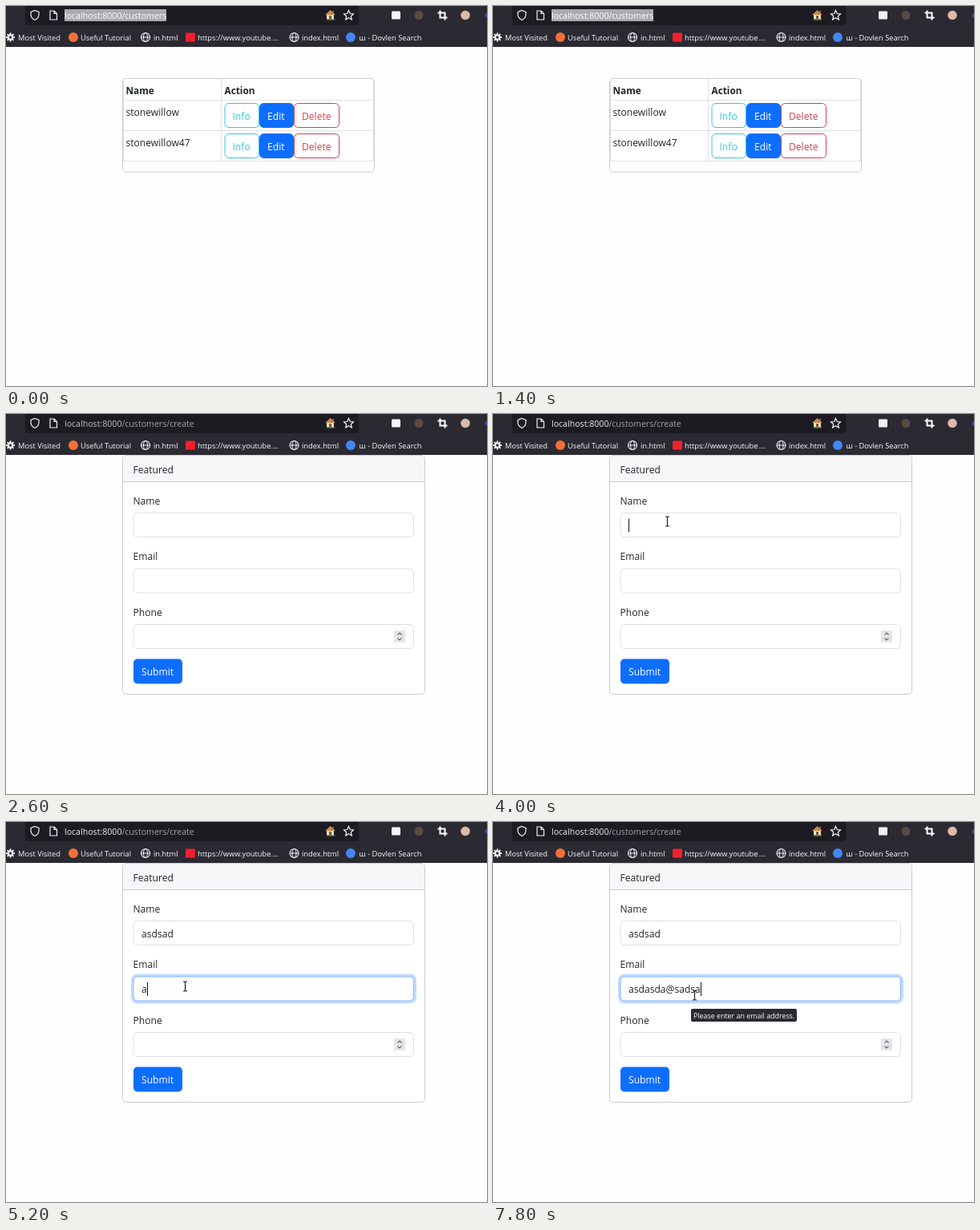
Recreate the animation shown at these times as an HTML page with a canvas. Size 600 by 474 pixels, loop 8000 ms.

```html
<!DOCTYPE html>
<html lang="en">
<head>
<meta charset="utf-8">
<title>Customers</title>
<style>
html, body { margin: 0; width: 100%; height: 100%; overflow: hidden; background: #fefefe; }
canvas { display: block; width: 600px; height: 474px; }
</style>
</head>
<body>
<canvas id="stage" width="600" height="474"></canvas>
<script>
const LOOP = 8000, STEP = 200;
const ctx = document.getElementById('stage').getContext('2d');
const FONT = '"Open Sans", "Noto Sans", sans-serif';
const BAR = '#2b2a33', INK = '#212529', BLUE = '#0d6efd', PALE = '#f4f4f8';

// Last entry whose start time has passed
const at = (track, t) => track.reduce((now, k) => (k[0] <= t ? k : now));

// time, x, y, shape
const pointer = [
  [0], [200, 560, 4, 'arrow'], [400, 430, 60, 'arrow'], [600, 300, 96, 'arrow'],
  [800, 222, 98, 'arrow'], [1000, 380, 50, 'arrow'], [1200, 486, 6, 'arrow'], [1400],
  [2000, 489, 1, 'arrow'], [2200, 589, 2, 'arrow'], [2600],
  [2800, 585, 4, 'arrow'], [3000, 470, 50, 'arrow'], [3200, 340, 96, 'arrow'],
  [3400, 250, 132, 'beam'], [3600, 219, 135, 'beam'], [3800, 217, 134, 'beam'],
  [4800, 222, 199, 'beam'], [5000, 223, 205, 'beam'],
  [6200, 240, 210, 'beam'], [6400, 249, 214, 'beam'], [7000, 250, 215, 'beam'], [7200, 251, 216, 'beam']
];
const nameText = [[0, ''], [4200, 'a'], [4400, 'asd'], [4600, 'asdsad']];
const emailText = [
  [0, ''], [5200, 'a'], [5400, 'asd'], [5600, 'asdas'], [5800, 'asdasda'],
  [6400, 'asdasda@'], [6600, 'asdasda@s'], [6800, 'asdasda@sa'], [7000, 'asdasda@sad'], [7200, 'asdasda@sadsa']
];

function text(str, x, y, size = 12.1, color = INK, weight = 400) {
  ctx.font = `${weight} ${size}px ${FONT}`;
  ctx.fillStyle = color;
  ctx.fillText(str, x, y);
  return ctx.measureText(str).width;
}

function rect(x, y, w, h, color) {
  ctx.fillStyle = color;
  ctx.fillRect(x, y, w, h);
}

function box(x, y, w, h, r, fill, stroke, width = 1) {
  ctx.beginPath();
  ctx.roundRect(x, y, w, h, r);
  paint(fill, stroke, width);
}

function disc(x, y, r, fill, stroke, width = 1) {
  ctx.beginPath();
  ctx.arc(x, y, r, 0, Math.PI * 2);
  paint(fill, stroke, width);
}

function shape(d, x, y, fill, stroke, width = 1) {
  ctx.save();
  ctx.translate(x, y);
  const path = new Path2D(d);
  if (fill) { ctx.fillStyle = fill; ctx.fill(path); }
  if (stroke) { ctx.strokeStyle = stroke; ctx.lineWidth = width; ctx.stroke(path); }
  ctx.restore();
}

function paint(fill, stroke, width) {
  if (fill) { ctx.fillStyle = fill; ctx.fill(); }
  if (stroke) { ctx.strokeStyle = stroke; ctx.lineWidth = width; ctx.stroke(); }
}

function globe(x, y) {
  disc(x, y, 5.5, null, PALE, 1.1);
  ctx.beginPath();
  ctx.ellipse(x, y, 2.5, 5.5, 0, 0, Math.PI * 2);
  paint(null, PALE, 1);
  shape('M-5.5 0H5.5', x, y, null, PALE);
}

function gear(x, y) {
  for (let i = 0; i < 8; i++) {
    const a = i * Math.PI / 4;
    shape(`M0 0L${5.5 * Math.cos(a)} ${5.5 * Math.sin(a)}`, x, y, null, PALE, 1.9);
  }
  disc(x, y, 3.8, PALE);
  disc(x, y, 1.7, BAR);
}

function address(t) {
  const host = 'localhost:8000';
  if (t < 2600) {
    rect(73, 4, 127, 15, '#aaa9ad');
    text(host + '/customers', 73, 16, 10.6, '#fff');
    return;
  }
  const w = text(host, 73, 16, 10.6, t < 2800 ? '#bdbdc1' : '#ededf2');
  text('/customers/create', 73 + w, 16, 10.6, '#a3a2a8');
}

function browser(t) {
  rect(0, 0, 600, 51, BAR);
  box(24, -6, 416, 30, 3, '#1c1b22');
  shape('M0 -6L5 -4V-1C5 3 2 5 0 6C-2 5 -5 3 -5 -1V-4Z', 36, 11.5, null, PALE, 1.2);
  shape('M-4 -5.5H1L4.5 -2V5.5H-4ZM1 -5.5V-2H4.5', 59, 11.5, null, PALE, 1.2);
  address(t);

  rect(400, 10, 9, 7, '#eee3c8');
  rect(403, 12, 3, 5, '#7b5638');
  rect(407, 6, 2, 4, '#a34a32');
  shape('M-6.5 0L0 -6L6.5 0Z', 404.5, 11, '#c78a50');
  rect(400, 16, 10, 1.5, '#5c9d48');
  shape('M0 -6L1.8 -2L6 -1.6L2.8 1.2L3.8 5.5L0 3.2L-3.8 5.5L-2.8 1.2L-6 -1.6L-1.8 -2Z', 427.5, 11.5, null, PALE, 1.2);

  if (t >= 1200 && t < 1400) box(473, -2, 28, 26, 3, '#52525e');
  box(481, 6.5, 11, 10, 1, PALE);
  disc(515, 11.5, 5.5, '#5a4b42');
  shape('M-3 -6V3H6M-6 -3H3V6', 544.5, 11.5, null, '#fff', 2);
  disc(573, 11.5, 5.8, '#dcb9a8');
  disc(600, 11.5, 2.5, '#5638c8');

  const label = (str, x) => text(str, x, 42.5, 9.3, '#fbfbfe');
  gear(5.5, 39);
  label('Most Visited', 15);
  disc(84, 39, 6, '#f2703a');
  label('Useful Tutorial', 93);
  globe(174, 39);
  label('in.html', 184);
  box(224, 33.5, 12, 11, 1, '#f0202c');
  label('https://www.youtube....', 239);
  globe(359.5, 39);
  label('index.html', 369);
  disc(430, 39, 6, '#4285f4');
  label('ш - Dovlen Search', 440.5);
}

function button(str, x, y, w, color, solid) {
  box(x + .5, y + .5, w - 1, 30, 5, solid ? color : null, color);
  text(str, x + 10, y + 21, 12.1, solid ? '#fff' : color);
}

function list() {
  box(145.5, 90.5, 314, 116.5, 4.5, '#fff', '#cbccd2');
  for (const y of [117, 155, 193]) rect(146, y, 313, 1, '#dee0e5');
  rect(268, 91, 1, 103, '#dee0e5');
  rect(146, 91, 1, 103, '#dee0e5');
  rect(458, 91, 1, 103, '#dee0e5');
  text('Name', 149.5, 109.5, 11.8, INK, 700);
  text('Action', 272.5, 109.5, 11.8, INK, 700);
  ['stonewillow', 'stonewillow47'].forEach((name, i) => {
    const y = 121 + i * 38;
    text(name, 149.5, y + 15.5);
    button('Info', 272.5, y, 43.5, '#35c5e4');
    button('Edit', 316, y, 43, BLUE, true);
    button('Delete', 359, y, 57, '#d2414f');
  });
}

function field(label, y, value, focus, caret) {
  text(label, 158.5, y - 10.5);
  if (focus) box(156, y - 3, 356, 37, 8, '#c2dbfe');
  box(159, y + .5, 349.5, 30, 5, '#fff', focus ? '#86b7fe' : '#dddfe6');
  const w = text(value, 169, y + 20.5);
  if (caret) rect(Math.round(169 + w), y + 7.5, 1, 17, '#111');
}

function form(t) {
  box(145.5, 51.5, 377, 298, 4.5, '#fff', '#cbccd2');
  box(146, 52, 376, 32, [4, 4, 0, 0], '#f7f7f9');
  rect(146, 84, 376, 1, '#cbccd2');
  text('Featured', 158.5, 73.5);
  const onName = t >= 4200 && t < 5000;
  const nameCaret = t >= 4000 && t < 5000;
  const emailCaret = t >= 5000 && !(t >= 7200 && t < 7800);
  field('Name', 123, at(nameText, t)[1], onName, nameCaret);
  field('Email', 192.5, at(emailText, t)[1], t >= 5000, emailCaret);
  field('Phone', 262, '', false, false);
  rect(484, 270, 14, 15, '#e5e5e9');
  shape('M-2.5 -2L0 -4.5L2.5 -2M-2.5 2L0 4.5L2.5 2', 491, 277.5, null, '#66666d', 1.2);
  box(159, 305.5, 61, 31, 5, BLUE);
  text('Submit', 169, 326, 12.1, '#fff');
  if (t >= 6600) {
    box(247, 233, 132, 16, 2, BAR);
    text('Please enter an email address.', 250, 244.8, 8.9, '#fff');
  }
}

function cursor(t) {
  const [, x, y, kind] = at(pointer, t);
  if (kind === 'arrow') shape('M0 0V13L3 10.2L5 15L7.2 14L5.2 9.4H9.4Z', x, y, '#fff', '#111', .8);
  if (kind === 'beam') {
    const d = 'M-2.5 -6H-.8L0 -5.2L.8 -6H2.5M0 -5.2V5.2M-2.5 6H-.8L0 5.2L.8 6H2.5';
    shape(d, x + .5, y, null, '#222', 1.2);
  }
}

function draw(now) {
  const t = Math.floor((now % LOOP) / STEP) * STEP;
  rect(0, 0, 600, 474, '#fefefe');
  if (t < 2600) list(); else form(t);
  browser(t);
  cursor(t);
  requestAnimationFrame(draw);
}
requestAnimationFrame(draw);
</script>
</body>
</html>
```
